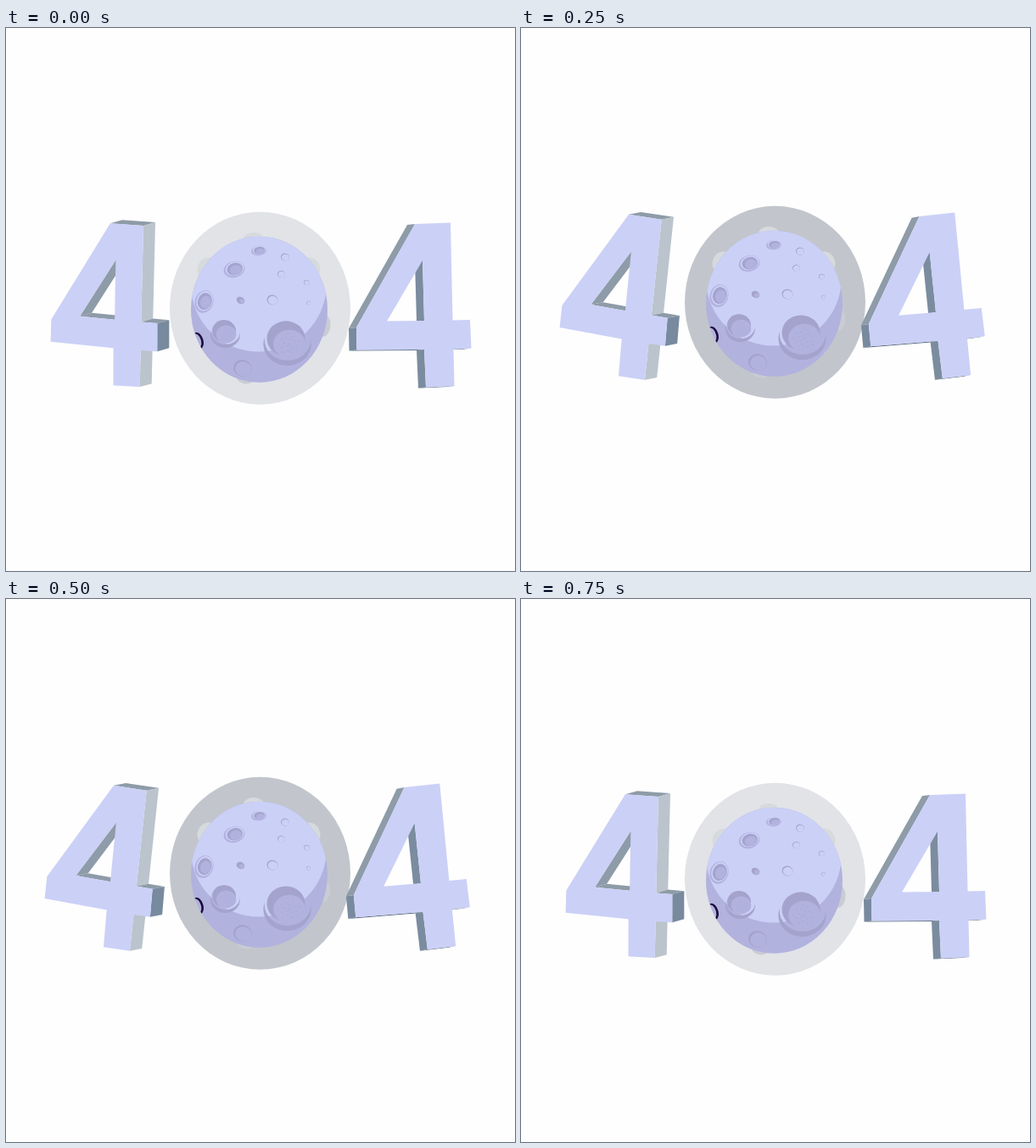
Recreate the animation shown at these times as an HTML page with a canvas. Size 600 px wide and 640 px high, loop 830 ms.

```html
<!DOCTYPE html>
<html lang="en">
<head>
<meta charset="utf-8">
<title>404</title>
<style>
  html, body { margin: 0; width: 600px; height: 640px; overflow: hidden; background: #fefefe; }
  canvas { display: block; }
</style>
</head>
<body>
<canvas id="stage" width="600" height="640"></canvas>
<script>
const ctx = document.getElementById('stage').getContext('2d');
const LOOP = 830, STEPS = 10;
const PAPER = '#fefefe', LIGHT = '#cbd0f7', DIM = '#b1b2de', DARK = '#a4a3cd';

// The digit 4, measured from its top right corner. The hole runs the other way round.
const OUTLINE = [
  [-42, 1.5], [0, 0], [2.5, 115], [23, 114.5], [24.5, 148], [3.5, 149],
  [4.5, 192.5], [-29, 194], [-31, 149.5], [-110.5, 150], [-111, 123.5]
];
const HOLE = [[-33, 44.5], [-75, 116], [-31, 115.5]];

// shape: a, b, c, d of the canvas matrix; from and to: the top right corner at both ends of the swing.
const leftFour = {
  shape: [0.93, 0.1, -0.044, 0.985], from: [162, 233], to: [167, 223.2],
  turn: 0.109, depth: [14.8, -5.5], side: '#bbc4cc'
};
const rightFour = {
  shape: [1, 0, 0, 1], from: [524, 229.5], to: [507, 213.4],
  turn: -0.1, depth: [-9, 1], side: '#7b8c9f'
};

const mix = (a, b, k) => a + (b - a) * k;

function trace(points) {
  points.forEach(([x, y], i) => i ? ctx.lineTo(x, y) : ctx.moveTo(x, y));
  ctx.closePath();
}

function wallColor(ex, ey, side) {
  const upright = Math.abs(ey) > 4 * Math.abs(ex);
  if (upright) return Math.abs(ey) < 40 ? '#788a9e' : side;
  return ex < 0 && ey < 4 ? '#566a7d' : '#8e9ba8';
}

// Walls that face the viewer join the front to its shifted copy.
function drawWalls(points, [dx, dy], side) {
  points.forEach(([x, y], i) => {
    const [x2, y2] = points[(i + 1) % points.length];
    const ex = x2 - x, ey = y2 - y;
    if (ey * dx - ex * dy <= 0) return;
    ctx.beginPath();
    trace([[x, y], [x2, y2], [x2 + dx, y2 + dy], [x + dx, y + dy]]);
    ctx.fillStyle = wallColor(ex, ey, side);
    ctx.fill();
  });
}

function drawFour({ shape, from, to, turn, depth, side }, k) {
  ctx.save();
  ctx.translate(mix(from[0], to[0], k), mix(from[1], to[1], k));
  ctx.rotate(turn * k);
  ctx.transform(...shape, 0, 0);
  drawWalls(OUTLINE, depth, side);
  drawWalls(HOLE, depth, side);
  ctx.beginPath();
  trace(OUTLINE);
  trace(HOLE);
  ctx.fillStyle = LIGHT;
  ctx.fill();
  ctx.restore();
}

function oval(color, x, y, rx, ry, turn = 0) {
  ctx.beginPath();
  ctx.ellipse(x, y, rx, ry, turn, 0, 7);
  ctx.fillStyle = color;
  ctx.fill();
}

// The part of an ellipse left over after removing a smaller, shifted copy.
function crescent(color, x, y, rx, ry, dx, dy, turn = 0, shrink = 0.88) {
  ctx.save();
  ctx.beginPath();
  ctx.ellipse(x, y, rx, ry, turn, 0, 7);
  ctx.clip();
  ctx.beginPath();
  ctx.rect(0, 0, 600, 640);
  ctx.ellipse(x + dx, y + dy, rx * shrink, ry * shrink, turn, 0, 7);
  ctx.fillStyle = color;
  ctx.fill('evenodd');
  ctx.restore();
}

function pit(x, y, r, squash, turn) {
  crescent(DIM, x, y, r, r * squash, 0.6, -0.8, turn);
  oval(DARK, x + 0.8, y - 0.4, r * 0.74, r * squash * 0.76, turn);
  oval(DIM, x + 1.8, y + 0.6, r * 0.56, r * squash * 0.58, turn);
}

function basin(x, y, r) {
  crescent(DARK, x + 1.5, y + r * 0.3, r * 1.25, r * 1.12, 0.5, -r * 0.24, 0, 0.97);
  oval(DARK, x, y, r, r * 0.92);
  const cx = x + r * 0.18, cy = y + r * 0.28;
  oval(DIM, cx, cy, r * 0.84, r * 0.74);
  for (let i = 0; i < 18; i++) {
    const d = r * 0.14 * Math.sqrt(i), a = i * 2.4;
    oval('#acabd6', cx + d * Math.cos(a), cy + d * Math.sin(a), r * 0.05, r * 0.04);
  }
}

function drawPits() {
  pit(298, 262.5, 9, 0.62, -0.1);
  pit(269, 284.5, 12.5, 0.76, -0.25);
  pit(233.5, 322.5, 13.5, 0.8, 1.87);
  oval(DARK, 276.5, 321, 5, 4, 0.5);
  oval(DIM, 278, 322, 3, 2.5, 0.5);

  const nicks = [[329, 270, 5], [324.5, 290, 4.5], [354.5, 300, 3.5], [356.5, 324, 2.5], [314, 320.5, 6.5], [279, 401, 11]];
  for (const [x, y, r] of nicks) crescent(DARK, x, y, r, r * 0.9, r * 0.08, r * 0.08, 0.25);

  basin(257, 357, 14);
  basin(330, 366, 22.5);
  crescent('#1d0a3d', 226.5, 368.5, 6, 10, -2, 0.4, -0.3, 0.9);
}

function drawMoon(k) {
  ctx.save();
  ctx.translate(0, -9.2 * k);
  const ring = [[225, 181], [227, 186], [231, 193]].map(([a, b]) => Math.round(mix(a, b, k ** 1.2)));
  oval(`rgb(${ring})`, 299.5, 330.2, 106.5, 113.5);

  oval('#d7dadd', 292, 249, 12, 8);
  for (const side of [-1, 1]) oval('#d7dadd', 298 + side * 61, 283, 11, 13, -side / 2);
  oval('#c9ccd3', 373, 350, 9.5, 14);
  oval('#c9ccd3', 283, 411, 11, 8.5);

  oval(DIM, 298.5, 331.7, 80.5, 86);
  ctx.clip();
  oval(LIGHT, 297.8, 302, 80, 79.5);
  drawPits();
  ctx.restore();
}

function draw(time) {
  // Steps start on hundredths of a second, evenly spread over the loop.
  let step = 0;
  while (step < STEPS - 1 && Math.round((step + 1) * 25 / 3) * 10 <= time) step++;
  const k = Math.min(step, STEPS - 1 - step) / 4;
  ctx.fillStyle = PAPER;
  ctx.fillRect(0, 0, 600, 640);
  drawMoon(k);
  drawFour(leftFour, k);
  drawFour(rightFour, k);
}

const begin = performance.now();
function tick() {
  draw((performance.now() - begin) % LOOP);
  requestAnimationFrame(tick);
}
tick();
</script>
</body>
</html>
```
